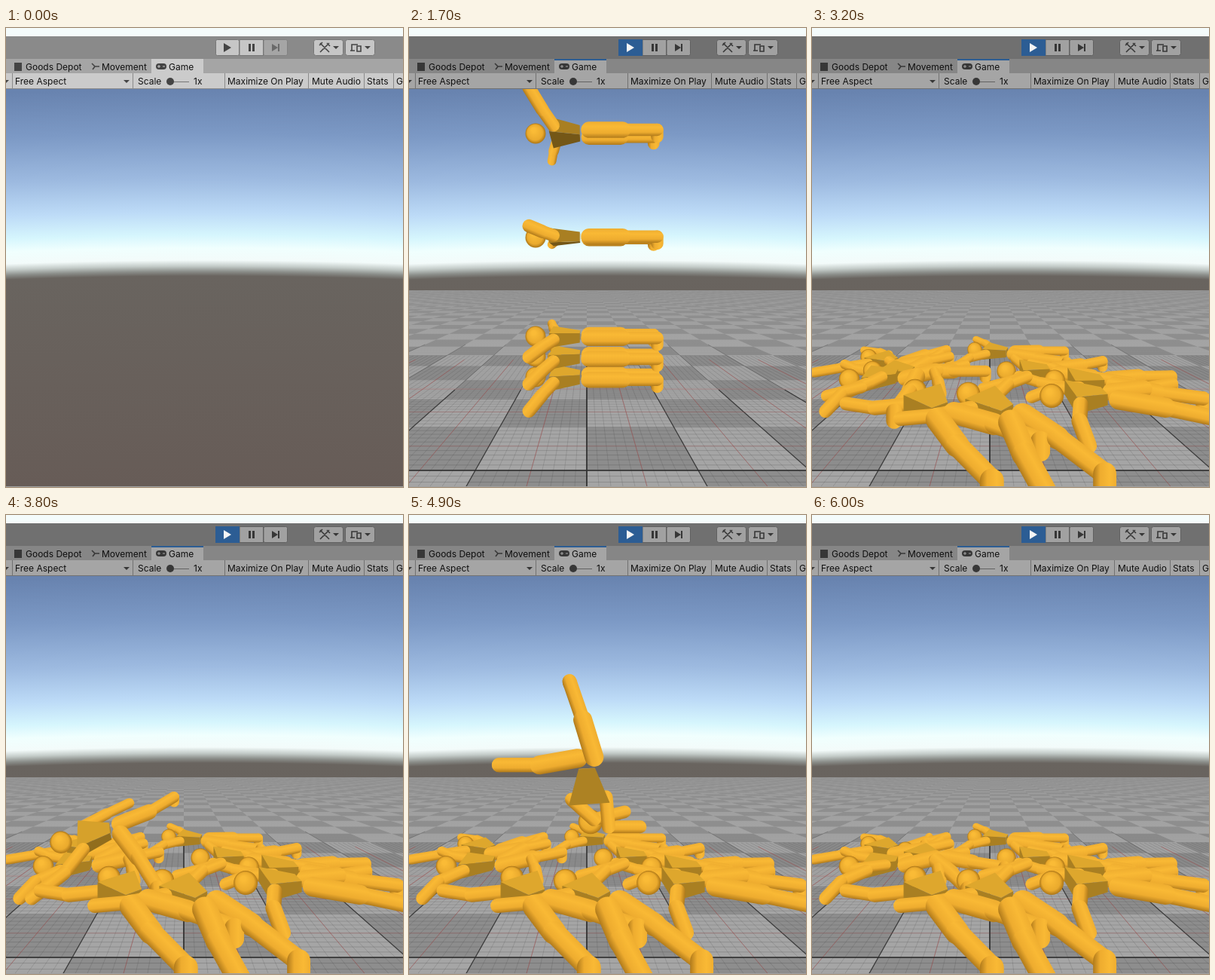
An HTML page with a canvas that plays this animation: 527x609 px, repeating every 6100 ms.

```html
<!DOCTYPE html>
<html lang="en">
<head>
<meta charset="utf-8">
<title>Falling figures</title>
<style>
html, body { margin: 0; width: 100%; height: 100%; overflow: hidden; background: #f4fbfb; }
canvas, svg { position: absolute; left: 0; top: 0; }
text { font: 12px Inter, Roboto, sans-serif; fill: #111; }
.btn { fill: #c6c6c6; stroke: #777; }
.icon { fill: #444; }
.line { fill: none; stroke: #444; stroke-width: 1.6; }
.live, .tint { visibility: hidden; }
.playing .live, .playing .tint { visibility: visible; }
#step { opacity: .45; }
.running #step { opacity: 1; }
.hover #tools { fill: #dedede; }
</style>
</head>
<body>
<canvas id="view" width="527" height="609"></canvas>
<svg id="ui" width="527" height="609">
  <path fill="#f4fbfb" d="M0 0h527v11H0z"/>
  <path fill="#8a8a8a" d="M0 11h527v30H0z"/>
  <path fill="#a5a5a5" d="M0 41h527v19H0z"/>
  <path fill="#cbcbcb" d="M0 60h527v21H0zM193 41h69v20h-69z"/>
  <path fill="none" stroke="#8b8b8b" d="M0 80.500h527M8.500 60v20M168.500 60v20M290.500 60v20M401.500 60v20M475.500 60v20M514.500 60v20"/>
  <rect class="btn" x="278.500" y="15.500" width="31" height="21" rx="2"/>
  <rect class="btn" x="310" y="15.500" width="31.500" height="21"/>
  <path class="icon" d="M289 20l10 6-10 6zM322 21h3v10h-3zM327 21h3v10h-3z"/>
  <g id="step"><rect class="btn" x="342" y="15.500" width="31.500" height="21" rx="2"/>
    <path class="icon" d="M353 21l8 5-8 5zM361 21h2v10h-2z"/></g>
  <rect id="tools" class="btn" x="408.500" y="15.500" width="39" height="21" rx="3"/>
  <rect class="btn" x="450.500" y="15.500" width="39" height="21" rx="3"/>
  <path class="line" d="M417 20l12 12M429 20l-12 12M416 23l4-4M426 20l4 4M459 30v-8h8M457 30h6M466 24h5v7h-5z"/>
  <path class="icon" d="M434 24h8l-4 4zM476 24h8l-4 4zM156 69h8l-4 4zM-4 69h8l-4 4z"/>
  <rect class="icon" x="11" y="46" width="10" height="11"/>
  <path class="line" d="M114 47l4 4-3 4M118 51h6"/>
  <rect class="icon" x="199" y="47" width="14" height="8" rx="4"/>
  <path stroke="#cbcbcb" d="M201 51h4M203 49v4M208 51h3"/>
  <path stroke="#777" d="M218 71.500h25"/><circle class="icon" cx="218" cy="71" r="5"/>
  <text x="26" y="56">Goods Depot</text>
  <text x="127" y="56">Movement</text>
  <text x="216" y="56">Game</text>
  <text x="12" y="75">Free Aspect</text>
  <text x="175" y="75">Scale</text>
  <text x="249" y="75">1x</text>
  <text x="294" y="75">Maximize On Play</text>
  <text x="406" y="75">Mute Audio</text>
  <text x="479" y="75">Stats</text>
  <text x="518" y="75">G</text>
  <path class="tint" fill="#000" opacity=".19" d="M0 11h527v70H0z"/>
  <g class="live">
    <path fill="#2c5d94" d="M278 15h32v22h-32zM193 41h69v2h-69z"/>
    <path fill="#f4f4f4" d="M289 20l10 6-10 6z"/>
  </g>
</svg>
<script>
const LOOP = 6100, STEP = 100, PLAY = 800, START = 1200;
const W = 527, TOP = 81, BOTTOM = 608, HORIZON = 325, CENTRE = 236;
const EYE = 150, LENS = 345, REST = 12;
const view = document.getElementById('view').getContext('2d');
const ui = document.getElementById('ui');

function layer(paint) {
  const canvas = document.createElement('canvas');
  canvas.width = W;
  canvas.height = 609;
  paint(canvas.getContext('2d'));
  return canvas;
}

const sky = layer(c => {
  const stops = [[81, '#6883af'], [140, '#7c99c5'], [200, '#9dbae0'], [245, '#bddbf7'], [275, '#d6f6fd'],
    [292, '#f0fffe'], [308, '#f3fbfa'], [316, '#c3cbc8'], [323, '#8b8e8a'], [329, '#69645f'], [608, '#675c57']];
  for (let x = 0; x < W; x++) {
    const bend = 5 * ((x - 264) / 264) ** 2;
    const g = c.createLinearGradient(0, TOP + bend, 0, BOTTOM + bend);
    stops.forEach(([y, color]) => g.addColorStop((y - TOP) / (BOTTOM - TOP), color));
    c.fillStyle = g;
    c.fillRect(x, TOP, 1, BOTTOM - TOP);
  }
});

const floor = layer(c => {
  const EDGE = 348;
  const rowY = n => HORIZON + 1 / (.003817 + .00107 * n);
  const colX = (n, y) => CENTRE + n * .565 * (y - HORIZON);
  const stroke = (color, width, x0, y0, x1, y1) => {
    c.strokeStyle = color;
    c.lineWidth = width;
    c.beginPath();
    c.moveTo(x0, y0);
    c.lineTo(x1, y1);
    c.stroke();
  };
  const column = (color, width, n, from) => stroke(color, width, colX(n, from), from, colX(n, 620), 620);
  c.beginPath();
  c.rect(0, EDGE, W, BOTTOM - EDGE);
  c.clip();
  c.fillStyle = '#a5a5a5';
  c.fillRect(0, EDGE, W, 260);
  c.fillStyle = '#8d8d8d';
  for (let r = -1; r < 38; r++) {
    const near = rowY(r), far = rowY(r + 1);
    for (let q = -22; q < 22; q++) {
      if ((q + r) & 1) continue;
      c.beginPath();
      c.moveTo(colX(q, near), near);
      c.lineTo(colX(q + 1, near), near);
      c.lineTo(colX(q + 1, far), far);
      c.lineTo(colX(q, far), far);
      c.fill();
    }
  }
  for (let i = -10; i < 60; i++) {
    const y = rowY(i / 10);
    stroke(`rgba(50,50,50,${Math.max(.06, .34 - i * .006)})`, .6, 0, y, W, y);
  }
  for (let i = -60; i <= 60; i++) column('rgba(50,50,50,.26)', .6, i / 10, 435);
  for (let i = -4; i < 4; i++) {
    column('rgba(170,75,75,.5)', 1, i + .5, 440);
    column('rgba(40,40,40,.3)', 1, i, 420);
    column('rgba(40,40,40,.7)', 1.3, i, 480);
  }
  for (let r = 0; r < 3; r++) stroke('rgba(170,75,75,.4)', .8, 0, rowY(r + .5), W, rowY(r + .5));
  stroke('#292929', 1.5, 0, rowY(0), W, rowY(0));
  stroke('#333', 1.5, CENTRE, 425, CENTRE, BOTTOM);
  const haze = c.createLinearGradient(0, EDGE, 0, 430);
  haze.addColorStop(0, 'rgba(142,142,142,.6)');
  haze.addColorStop(1, 'rgba(150,150,150,0)');
  c.fillStyle = haze;
  c.fillRect(0, EDGE, W, 92);
});

const rad = degrees => degrees * Math.PI / 180;
const clamp = u => Math.min(1, Math.max(0, u));
const random = n => {
  const v = Math.sin(n * 12.9898) * 43758.5453;
  return v - Math.floor(v);
};

function mix(a, b, u) {
  if (typeof a === 'number') return a + (b - a) * u;
  if (Array.isArray(a)) return a.map((v, i) => mix(v, b[i], u));
  return Object.fromEntries(Object.keys(a).map(k => [k, mix(a[k], b[k], u)]));
}

// World points are [right, up, away]; the camera looks along the third axis.
function project([x, y, z]) {
  const k = LENS / Math.max(60, z);
  return { x: CENTRE + x * k, y: HORIZON + (EYE - y) * k, k };
}
const place = (x, y, k) => [(x - CENTRE) / k, EYE - (y - HORIZON) / k, LENS / k];
const onFloor = (x, y) => place(x, y, (y - HORIZON) / (EYE - REST));
const distance = ([x, y, z]) => Math.hypot(x, y - EYE, z);
const middle = (...points) => [0, 1, 2].map(i => points.reduce((sum, p) => sum + p[i], 0) / points.length);

// Limbs are pairs of angles within the plane of the body; tilt turns that plane from flat to upright.
const falling = {
  hip: [3, 0, LENS], tilt: 0, spine: 0,
  arms: [[-105, -102], [105, 102]], legs: [[0, 0], [0, 0]]
};

function sprawl(seed, x, y, spine, legs) {
  const vary = (n, from, to) => from + (to - from) * random(seed * 7 + n);
  const arm = (side, n) => {
    const reach = spine + side * vary(n, 95, 170);
    return [reach, reach + vary(n + 1, -35, 35)];
  };
  const split = vary(5, 12, 22), knee = vary(6, -8, 8);
  return {
    hip: onFloor(x, y), tilt: 0, spine, arms: [arm(-1, 1), arm(1, 3)],
    legs: [[legs - split, legs - split + knee], [legs + split, legs + split - knee]]
  };
}

const rests = [
  [115, 447, -30, 42], [268, 431, -15, -12], [325, 455, 0, 0], [125, 461, 10, 52],
  [398, 470, -5, -8], [402, 488, 0, -6], [178, 515, -50, -42], [272, 518, -45, -68], [143, 459, -10, -40]
].map((spec, i) => sprawl(i + 1, ...spec));

const acrobat = rests.length - 1;
rests[acrobat].legs = [[-85, -92], [2, 0]];
const handstand = {
  hip: place(167, 333, 1.14), tilt: 90, spine: 63,
  arms: [[-105, -109], [-107, -85]], legs: [[5, 6], [77, 113]]
};
const flip = {
  hip: place(235, 322, 1.2), tilt: 90, spine: 94,
  arms: [[-85, 0], [-42, 14]], legs: [[107, 109], [190, 180]]
};
const stunt = [
  [3500, rests[acrobat]], [4300, handstand], [4600, { ...flip, hip: place(210, 241, 1.2) }],
  [4900, flip], [5300, sprawl(9, 172, 457, -30, -40)]
];

function stuntPose(t) {
  const next = stunt.findIndex(([time]) => time > t);
  if (next < 0) return stunt[stunt.length - 1][1];
  const [t0, a] = stunt[next - 1], [t1, b] = stunt[next];
  return mix(a, b, (t - t0) / (t1 - t0));
}

function pose(i, t) {
  if (i === acrobat && t >= stunt[0][0]) return stuntPose(t);
  const slide = Math.sin(clamp((t - 1900) / 1300) * Math.PI / 2);
  const tumble = Math.sin(slide * Math.PI);
  const p = mix(falling, rests[i], slide);
  const lean = tumble * (i * 6 - 10);
  const turn = pair => pair.map(a => a + lean);
  const seconds = (t - 900) / 1000;
  const drop = 197 + 138 * (i - 3) + 480 * (.64 - seconds ** 2);
  p.hip[1] = Math.max(REST + 27 * i * (1 - slide), drop);
  return { ...p, tilt: tumble * 55, spine: p.spine + lean, arms: p.arms.map(turn), legs: p.legs.map(turn) };
}

function drawTube(from, to, width) {
  const a = project(from), b = project(to), w = width * (a.k + b.k) / 2;
  const dx = b.x - a.x, dy = b.y - a.y, length = Math.hypot(dx, dy);
  let nx = 0, ny = w / 2;
  if (length > 1) {
    const sign = dx < 0 ? -1 : 1;
    nx = -dy / length * sign * w / 2;
    ny = dx / length * sign * w / 2;
  }
  const mx = (a.x + b.x) / 2, my = (a.y + b.y) / 2;
  const g = view.createLinearGradient(mx - nx, my - ny, mx + nx, my + ny);
  g.addColorStop(0, '#efae30');
  g.addColorStop(.3, '#f9b935');
  g.addColorStop(.7, '#eeac2f');
  g.addColorStop(1, '#b07a1b');
  view.strokeStyle = g;
  view.lineCap = 'round';
  view.lineWidth = w;
  view.beginPath();
  view.moveTo(a.x, a.y);
  view.lineTo(b.x + .01, b.y);
  view.stroke();
}

function drawBall(centre, radius) {
  const { x, y, k } = project(centre), r = radius * k;
  const g = view.createRadialGradient(x - r * .2, y - r * .35, r * .2, x, y, r);
  g.addColorStop(0, '#fabb36');
  g.addColorStop(.7, '#eaaa2d');
  g.addColorStop(1, '#ac7617');
  view.fillStyle = g;
  view.beginPath();
  view.arc(x, y, r, 0, 7);
  view.fill();
}

// Corners are numbered in binary: waist, right side, top.
function drawBox(corners) {
  const core = middle(...corners);
  const minus = (p, q) => p.map((v, i) => v - q[i]);
  const dot = (p, q) => p.reduce((sum, v, i) => sum + v * q[i], 0);
  for (const face of ['0132', '4576', '0154', '2376', '0264', '1375']) {
    const p = [...face].map(n => corners[n]);
    const [ax, ay, az] = minus(p[1], p[0]), [bx, by, bz] = minus(p[3], p[0]);
    let normal = [ay * bz - az * by, az * bx - ax * bz, ax * by - ay * bx];
    const centre = middle(...p);
    if (dot(normal, minus(centre, core)) < 0) normal = normal.map(v => -v);
    if (dot(normal, minus(centre, [0, EYE, 0])) > 0) continue;
    const light = .76 + .24 * normal[1] / Math.hypot(...normal);
    view.fillStyle = `rgb(${222 * light},${167 * light},${45 * light})`;
    view.beginPath();
    p.map(project).forEach(q => view.lineTo(q.x, q.y));
    view.fill();
  }
}

function figureParts(p) {
  const rise = Math.sin(rad(p.tilt)), run = Math.cos(rad(p.tilt));
  const move = ([x, y, z], angle, length) => {
    const along = Math.cos(rad(angle)) * length, side = Math.sin(rad(angle)) * length;
    return [x + along, y + side * rise, z + side * run];
  };
  const raise = ([x, y, z], d) => [x, y + d * run, z - d * rise];
  const spot = (along, side) => move(move(p.hip, p.spine, along), p.spine + 90, side);
  const parts = [];
  const add = (draw, far) => parts.push({ draw, far });
  const tube = (a, b, width) => add(() => drawTube(a, b, width), distance(middle(a, b)));

  const head = spot(-71, 0);
  add(() => drawBall(head, 13.5), distance(head));
  const corners = Array.from({ length: 8 }, (_, n) => {
    const [along, half, thick] = n & 1 ? [-12, 9, 6] : [-50, 22, 9];
    return raise(spot(along, n & 2 ? half : -half), n & 4 ? thick : -thick);
  });
  add(() => drawBox(corners), distance(middle(...corners)));
  [-1, 1].forEach((side, n) => {
    const shoulder = spot(-45, 19 * side), hip = spot(0, 9 * side);
    const elbow = move(shoulder, p.arms[n][0], 33), hand = move(elbow, p.arms[n][1], 35);
    const knee = move(hip, p.legs[n][0], 43), ankle = move(knee, p.legs[n][1], 45);
    tube(shoulder, elbow, 15);
    tube(elbow, hand, 14);
    tube(hip, knee, 21);
    tube(knee, ankle, 16);
    tube(ankle, raise(ankle, -9), 16);
  });
  return parts;
}

function render(now) {
  const t = Math.floor(now % LOOP / STEP) * STEP;
  ui.classList.toggle('hover', t === 100);
  ui.classList.toggle('playing', t >= PLAY);
  ui.classList.toggle('running', t >= START);
  view.clearRect(0, 0, W, 609);
  view.drawImage(sky, 0, 0);
  if (t >= START) {
    view.drawImage(floor, 0, 0);
    view.save();
    view.beginPath();
    view.rect(0, TOP, W, BOTTOM - TOP);
    view.clip();
    rests.flatMap((_, i) => figureParts(pose(i, t)))
      .sort((a, b) => b.far - a.far)
      .forEach(part => part.draw());
    view.restore();
  }
  view.fillStyle = '#a0a0a0';
  view.fillRect(0, BOTTOM, W, 1);
}

const begin = performance.now();
(function loop() {
  render(performance.now() - begin);
  requestAnimationFrame(loop);
})();
</script>
</body>
</html>
```
